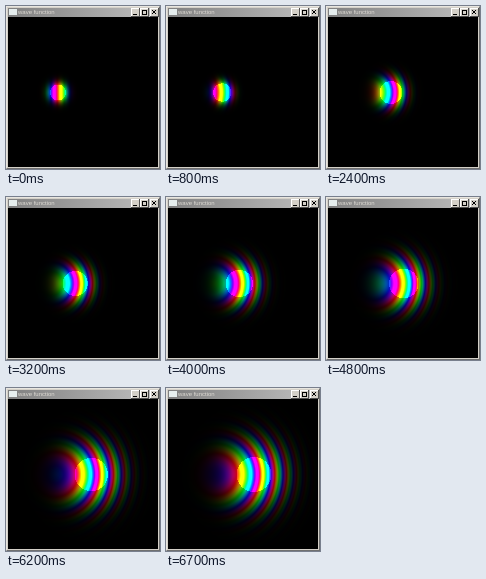
Recreate the animation shown at these times as an HTML page with a canvas. Size 154 by 163 pixels, loop 6.8 s.

```html
<!DOCTYPE html>
<html lang="en">
<head>
<meta charset="utf-8">
<title>wave function</title>
<style>
  html, body { margin: 0; width: 154px; height: 163px; overflow: hidden; background: #d4d0c8; }
  #win { position: relative; width: 154px; height: 163px; overflow: hidden; }
  #win > * { position: absolute; }
  #frame { inset: 0; box-sizing: border-box; border: 1px solid; border-color: #e8e6e0 #707070 #707070 #e8e6e0; }
  #bar { left: 2px; top: 2px; width: 150px; height: 9px; background: linear-gradient(90deg, #808080, #c0c0c0); }
  #icon { left: 3px; top: 3px; width: 8px; height: 6px; background: #e6eeee; }
  #title { left: 12px; top: 2px; font: 6px/9px "Liberation Sans", Arial, sans-serif; color: #dedbd4; white-space: nowrap; }
  svg { left: 125px; top: 2px; }
  canvas { left: 2px; top: 11px; }
</style>
</head>
<body>
<div id="win">
  <div id="frame"></div>
  <div id="bar"></div>
  <div id="icon"></div>
  <div id="title">wave function</div>
  <svg width="28" height="9" shape-rendering="crispEdges">
    <defs>
      <g id="btn">
        <path d="M0 0h9v9h-9z" fill="#505050"/>
        <path d="M0 0h8v8h-8z" fill="#fff"/>
        <path d="M1 1h7v7h-7z" fill="#d4d0c8"/>
      </g>
    </defs>
    <use href="#btn"/>
    <use href="#btn" x="9"/>
    <use href="#btn" x="19"/>
    <path d="M2 6h4v1h-4z"/>
    <path d="M11 2h5v5h-5zM12 3v3h3v-3z" fill-rule="evenodd"/>
    <path d="M21 2l4 4M25 2l-4 4" stroke="#000" shape-rendering="auto"/>
  </svg>
  <canvas id="view" width="150" height="150"></canvas>
</div>
<script>
const LOOP = 6800, STEP = 100;
const W = 150, H = 150, LEFT = 2, TOP = 11;
const START = 52, MID = 86.5, SPEED = 5.37, K = 0.315;
const RAD = Math.PI / 180, THIRD = 2 * Math.PI / 3;

const ctx = document.getElementById("view").getContext("2d");
const img = ctx.createImageData(W, H);
img.data.fill(255);

// Spreading Gaussian packet: hue shows the phase, brightness the amplitude.
function draw(t) {
  const tau = 0.448 * t;
  const chirp = tau / (72.8 * (1 + tau * tau));
  const spread = 64 + 16.9 * t * t;
  const core = (8 + 1.4 * t) ** 2;
  const cx = START + SPEED * t;
  const base = (8 + 88 * t) * RAD;
  let i = 0;
  for (let y = 0; y < H; y++) {
    const dy = y + TOP + 0.5 - MID;
    for (let x = 0; x < W; x++, i += 4) {
      const dx = x + LEFT + 0.5 - cx;
      const r2 = dx * dx + dy * dy;
      const phase = base + K * dx + chirp * r2;
      const inside = r2 < core;
      const gain = inside ? 255 : 205 * Math.exp((core - r2) / spread);
      for (let c = 0; c < 3; c++) {
        const wave = Math.cos(phase - c * THIRD);
        const level = inside ? 0.78 + 1.1 * wave : 0.43 + 0.72 * wave;
        img.data[i + c] = gain * Math.min(1, Math.max(0, level));
      }
    }
  }
  ctx.putImageData(img, 0, 0);
}

const origin = performance.now();
let last = -1;
function tick() {
  const ms = (performance.now() - origin) % LOOP;
  const step = Math.floor(ms / STEP);
  if (step !== last) {
    last = step;
    draw(step * STEP / 1000);
  }
  requestAnimationFrame(tick);
}
tick();
</script>
</body>
</html>
```
